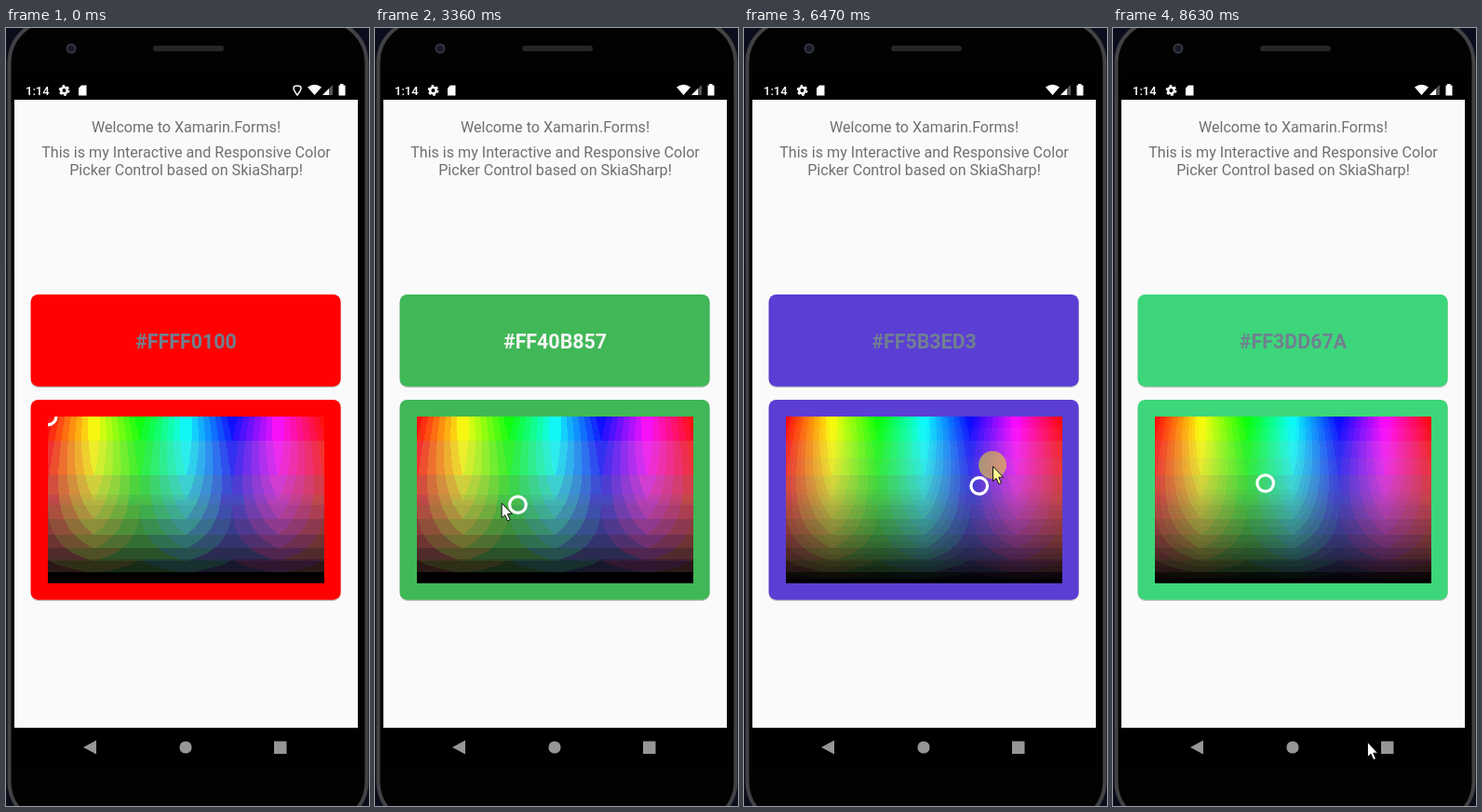
Recreate the animation shown at these times as an HTML page with a canvas. Size 390x835 px, loop 8810 ms.

```html
<!DOCTYPE html>
<html lang="en">
<head>
<meta charset="utf-8">
<title>Color picker</title>
<style>
html, body { margin: 0; width: 100%; height: 100%; overflow: hidden; background: #0c0d1c; }
svg, canvas { position: absolute; left: 0; top: 0; }
canvas { left: 45px; top: 417px; }
text { font-family: Roboto, sans-serif; }
.info { font-size: 16.1px; fill: #707070; text-anchor: middle; }
</style>
</head>
<body>
<svg width="390" height="835">
  <rect x="3.500" y="-8" width="384" height="862" rx="45" fill="#020203" stroke="#424244" stroke-width="4"/>
  <circle cx="70" cy="22" r="4.500" fill="#161a28" stroke="#34363f" stroke-width="2"/>
  <rect x="158" y="19" width="76" height="6" rx="3" fill="#262627"/>
  <rect x="9" y="50" width="369" height="745"/>
  <rect x="9" y="77" width="369" height="674" fill="#fafafa"/>
  <g fill="#fff">
    <text x="21" y="72" font-size="13" font-weight="500">1:14</text>
    <g fill="none" stroke="#fff" stroke-width="2.500">
      <circle cx="62.500" cy="67" r="3.300"/>
      <circle cx="62.500" cy="67" r="5" stroke-width="1.800" stroke-dasharray="2.600 2.636"/>
    </g>
    <path d="M81 61.500H86.500V72.500H78V64.500Z"/>
    <path id="pin" d="M313 72Q305 62 313 62T313 72Z" fill="none" stroke="#fff" stroke-width="1.500"/>
    <path d="M324 63.500Q331.500 58 339 63.500L331.500 72Z"/>
    <path d="M351 61V72H340Z" fill="#555"/>
    <path d="M347 65V72H340Z"/>
    <path d="M359 60H362.500V61.500H364.500V72.500H357.500V61.500H359Z"/>
  </g>
  <text class="info" x="193.500" y="112">Welcome to Xamarin.Forms!</text>
  <text class="info" x="193.500" y="139">This is my Interactive and Responsive Color</text>
  <text class="info" x="193.500" y="158">Picker Control based on SkiaSharp!</text>
  <defs>
    <g id="cards">
      <rect x="26.600" y="286" width="333" height="98.700" rx="8"/>
      <rect x="26.600" y="399" width="333" height="214.700" rx="8"/>
    </g>
  </defs>
  <use href="#cards" y="1.200" fill="#c4c4c4"/>
  <use id="face" href="#cards"/>
  <text id="label" x="193.500" y="344" font-size="21.400" font-weight="700" text-anchor="middle"></text>
  <g fill="#969696">
    <path d="M83 772L97 764.500V779.500Z"/>
    <circle cx="193" cy="772" r="6.600"/>
    <rect x="288" y="765.500" width="13.500" height="13.500"/>
  </g>
</svg>
<canvas id="coarse" width="297" height="179"></canvas>
<canvas id="fine" width="297" height="179"></canvas>
<svg width="390" height="835">
  <clipPath id="area"><rect x="45" y="417" width="297" height="179"/></clipPath>
  <g clip-path="url(#area)"><circle id="ring" r="8.800" fill="none" stroke="#fff" stroke-width="3.200"/></g>
  <g id="pointer">
    <circle id="press" cy="-1" r="15" fill="rgb(235,225,30)" fill-opacity=".55"/>
    <path id="arrow" d="M.5 .5V16.500L4 13.300L6.800 19.500L9.500 18.300L6.700 12.200H11.500Z" stroke="#111"/>
  </g>
</svg>
<script>
const LOOP = 8810, LEFT = 45, TOP = 417, W = 297, H = 179, LAG = 120;
const FIRST_DRAG = [780, 3640], SECOND_DRAG = [4130, 8080];
const $ = id => document.getElementById(id);
const clamp = (v, lo, hi) => Math.max(lo, Math.min(hi, v));

// Where the hand turns: time, x, y
const turns = [
  [90, 230, 745], [780, 45.2, 417], [2170, 243, 530.9], [2290, 294, 529],
  [3640, 116, 507], [4050, 64.9, 434.6], [4420, 64.9, 434.6],
  [5390, 114.4, 484.3], [5510, 112, 513], [6350, 252.7, 491.4], [6470, 267, 470],
  [7130, 149.5, 424.6], [7250, 200, 485], [8080, 163.7, 488.6], [8630, 273, 766]
];

// Ease from one turn to the next
function pointerAt(t) {
  const next = clamp(turns.findIndex(p => p[0] > t), 1, turns.length - 1);
  const i = t >= turns.at(-1)[0] ? turns.length - 1 : next;
  const [t0, x0, y0] = turns[i - 1], [t1, x1, y1] = turns[i];
  const k = clamp((t - t0) / (t1 - t0), 0, 1), e = k * k * (3 - 2 * k);
  return [x0 + (x1 - x0) * e, y0 + (y1 - y0) * e];
}

// The picked spot trails the pointer and rests between drags
function pickedAt(t) {
  const drag = t < SECOND_DRAG[0] + LAG ? FIRST_DRAG : SECOND_DRAG;
  return pointerAt(clamp(t - LAG, ...drag));
}

// Rainbow under a fade from transparent white to black
function colorAt([x, y]) {
  const hue = (x - LEFT) / W * 6, v = (y - TOP) / H;
  const veil = Math.round(255 * v * (1 - v));
  return [0, 2, 4].map(peak => {
    const d = Math.abs(hue - peak), near = Math.min(d, 6 - d);
    return Math.round(255 * clamp(2 - near, 0, 1) * (1 - v)) + veil;
  });
}

// Paint the picker in flat bands, each the mean of its color cell
function paintPicker(canvas, step) {
  const ctx = canvas.getContext('2d'), image = ctx.createImageData(W, H);
  const cells = {}, pixels = [];
  for (let y = 0; y < H; y++) for (let x = 0; x < W; x++) {
    const rgb = colorAt([LEFT + x + 0.5, TOP + y + 0.5]);
    const key = rgb.map(c => Math.floor(c / step)).join();
    const cell = cells[key] ??= { n: 0, sum: [0, 0, 0] };
    cell.n++;
    rgb.forEach((c, i) => cell.sum[i] += c);
    pixels.push(cell);
  }
  cells['0,0,0'].sum.fill(0);
  pixels.forEach((cell, i) => image.data.set([...cell.sum.map(s => s / cell.n), 255], i * 4));
  ctx.putImageData(image, 0, 0);
}

const show = (id, on) => $(id).style.display = on ? '' : 'none';
const move = (id, [x, y]) => $(id).setAttribute('transform', `translate(${x} ${y})`);
const fill = (id, color) => $(id).setAttribute('fill', color);

function draw(t) {
  const spot = pickedAt(t), rgb = colorAt(spot);
  const hex = rgb.map(c => c.toString(16).padStart(2, '0')).join('').toUpperCase();
  const light = Math.max(...rgb) + Math.min(...rgb) >= 255;
  const pressed = t >= SECOND_DRAG[0] + LAG && t < SECOND_DRAG[1];
  fill('face', '#' + hex);
  fill('label', light ? 'slategray' : 'whitesmoke');
  $('label').textContent = '#FF' + hex;
  move('ring', spot);
  move('pointer', pointerAt(t));
  show('pointer', t >= 90);
  show('press', pressed);
  fill('arrow', pressed ? '#ffff90' : '#fff');
  show('pin', t < 500);
  $('fine').style.opacity = t < 4900 ? 0 : 0.6;
}

paintPicker($('coarse'), 32);
paintPicker($('fine'), 16);
const start = performance.now();
function tick() {
  draw((performance.now() - start) % LOOP);
  requestAnimationFrame(tick);
}
tick();
</script>
</body>
</html>
```
